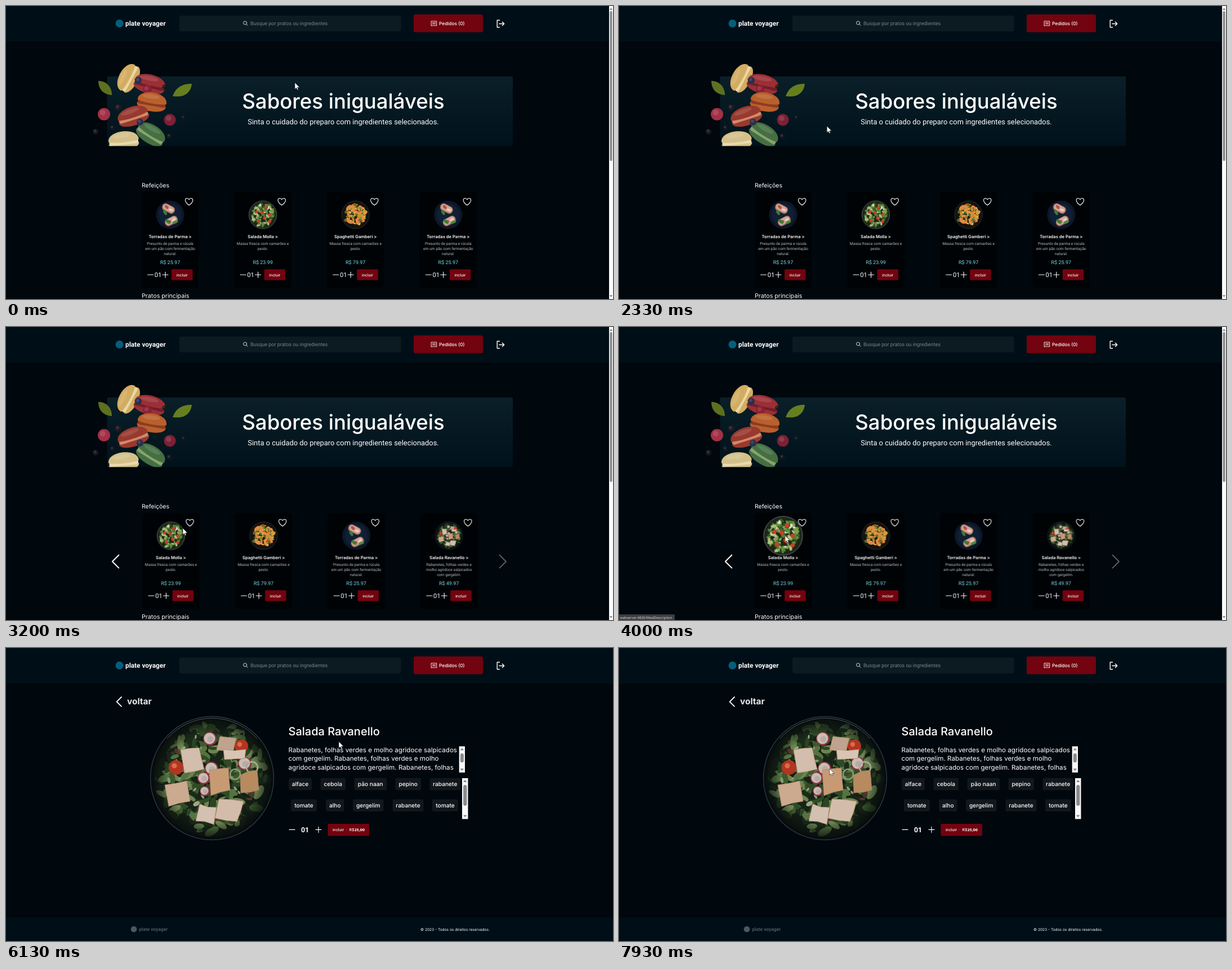
These frames come from a looping animation (1078 by 520 pixels, 8000 ms). An HTML page:

```html
<!DOCTYPE html>
<html lang="pt-BR">
<head>
<meta charset="utf-8">
<title>Cardápio</title>
<style>
html, body { margin: 0; width: 100%; height: 100%; overflow: hidden; background: #00070d; }
svg { display: block; width: 1078px; height: 520px; }
text { font-family: Inter, "Open Sans", sans-serif; font-optical-sizing: none; fill: #fff; text-rendering: geometricPrecision; white-space: pre; }
.r { font-family: Roboto, "Liberation Sans", sans-serif; }
.o { font-family: "Open Sans", "Noto Sans", sans-serif; }
.m { text-anchor: middle; }
.e { text-anchor: end; }
.line { fill: none; stroke: #fff; stroke-linecap: round; stroke-linejoin: round; }
.a { animation: 8s linear infinite; }
.home { animation-name: home; animation-timing-function: step-end; }
.detail { animation-name: detail; animation-timing-function: step-end; }
.status { animation-name: status; animation-timing-function: step-end; }
.prev { animation-name: prev; animation-timing-function: step-end; }
.next { animation-name: next; animation-timing-function: step-end; }
.slides { animation-name: slides; }
.grow { animation-name: grow; }
.cursor { animation-name: cursor; }

@keyframes home { 0% { visibility: visible } 51.6%, 100% { visibility: hidden } }
@keyframes detail { 0% { visibility: hidden } 51.6%, 100% { visibility: visible } }
@keyframes status { 0% { opacity: 0 } 43.7% { opacity: 1 } 57.5%, 100% { opacity: 0 } }
@keyframes prev { 0% { opacity: 0 } 33% { opacity: .35 } 37%, 100% { opacity: 1 } }
@keyframes next { 0% { opacity: 0 } 33% { opacity: 1 } 37%, 100% { opacity: .35 } }
@keyframes slides {
  0%, 34.5% { transform: translateX(0) }
  37% { transform: translateX(-85px) }
  37.5% { transform: translateX(-95px) }
  39.1% { transform: translateX(-160px) }
  40.4%, 100% { transform: translateX(-164.6px) }
}
@keyframes grow {
  0%, 40.8% { transform: scale(1); animation-timing-function: ease }
  45.6%, 100% { transform: scale(1.4) }
}
@keyframes cursor {
  0%, 2.5% { transform: translate(513px, 136px) }
  5% { transform: translate(520px, 100px) }
  7.5% { transform: translate(532px, 55px) }
  9.5% { transform: translate(531px, 30px) }
  11.5% { transform: translate(489px, 33px) }
  12.5% { transform: translate(494px, 33px) }
  16.3% { transform: translate(533px, 33px) }
  17.8% { transform: translate(520px, 32px) }
  19.1%, 21.7% { transform: translate(510px, 33px) }
  25.9%, 29% { transform: translate(378px, 193px) }
  29.1% { transform: translate(369px, 212px) }
  31% { transform: translate(380px, 270px) }
  33% { transform: translate(402px, 350px) }
  34.5% { transform: translate(402px, 358px) }
  37% { transform: translate(316px, 357px) }
  37.5%, 40% { transform: translate(314px, 357px) }
  43% { transform: translate(300px, 367px) }
  46.6%, 55.8% { transform: translate(295px, 370px) }
  60.9% { transform: translate(332px, 286px) }
  65.9% { transform: translate(452px, 218px) }
  68.5% { transform: translate(400px, 295px) }
  70% { transform: translate(380px, 307px) }
  72.5% { transform: translate(440px, 255px) }
  75% { transform: translate(560px, 151px) }
  76.6%, 77% { transform: translate(591px, 166px) }
  82% { transform: translate(601px, 230px) }
  87.5% { transform: translate(600px, 296px) }
  91% { transform: translate(636px, 323px) }
  96% { transform: translate(403px, 245px) }
  98.4%, 99.1% { transform: translate(452px, 305px) }
  99.13%, 100% { transform: translate(374px, 214px) }
}
</style>
</head>
<body>
<svg id="stage" viewBox="0 0 1078 520" xmlns="http://www.w3.org/2000/svg"></svg>
<script>
const RED = '#72030f', BAR = '#000f17', BLUE = '#065e7c', BRAND = 'plate voyager';

let seed = 7;
const rnd = () => (seed = (seed * 16807) % 2147483647) / 2147483647;

const text = (x, y, s, size, o = {}) =>
  `<text class="${o.c || ''}" x="${x}" y="${y}" font-size="${size}" font-weight="${o.w || 400}"` +
  `${o.f ? ` style="fill:${o.f}"` : ''}>${s.replace('>', '&gt;')}</text>`;
const rect = (x1, y1, x2, y2, fill, r = 0) =>
  `<rect x="${x1}" y="${y1}" width="${x2 - x1}" height="${y2 - y1}" rx="${r}" fill="${fill}"/>`;
const circle = (x, y, r, fill, extra = '') => `<circle cx="${x}" cy="${y}" r="${r}" fill="${fill}" ${extra}/>`;
const oval = (x, y, rx, ry, turn, fill) =>
  `<ellipse rx="${rx}" ry="${ry}" transform="translate(${x} ${y}) rotate(${turn})" fill="${fill}"/>`;
const line = (d, w = 1) => `<path class="line" d="${d}" stroke-width="${w}"/>`;
const shape = (d, fill) => `<path d="${d}" fill="${fill}"/>`;
const poly = (points, fill) => `<polygon points="${points}" fill="${fill}"/>`;
const group = (attrs, body) => `<g ${attrs}>${body}</g>`;
const minus = (x, y) => line(`M${x - 5} ${y}h10`, 1.1);
const plus = (x, y) => line(`M${x - 5} ${y}h10M${x} ${y - 5}v10`, 1.1);

// Flat pieces strewn evenly over a disc
function scatter(n, reach, size, colors) {
  let out = '';
  for (let i = 0; i < n; i++) {
    const a = rnd() * 6.283, d = reach * Math.sqrt(rnd()), s = size * (.6 + rnd() * .7);
    out += oval((d * Math.cos(a)).toFixed(1), (d * Math.sin(a)).toFixed(1), s.toFixed(1),
      (s * (.35 + rnd() * .3)).toFixed(1), Math.round(rnd() * 180), colors[i % colors.length]);
  }
  return out;
}

const toast = (x, y, turn) => group(`transform="translate(${x} ${y}) rotate(${turn})"`,
  rect(-12, -6.5, 12, 6.5, '#a8775a', 6) + rect(-10.5, -5.5, 10.5, 4.5, '#d5a397', 5) +
  oval(-4, -1, 4, 2.5, 20, '#b0514d') + oval(5, 0, 4, 2, -15, '#e6cfc1'));
const slice = ([x, y, r]) => circle(x, y, r, '#8e3343') + circle(x - .5, y - .5, r - 2, '#c9bdb6') +
  circle(x + 1, y + 1, r * .45, '#b9aaa3');
const tomato = ([x, y, r]) => circle(x, y, r, '#b2351f') + circle(x - 3, y - 3, r * .35, '#d96a4e');
const bread = (points, fill) => `<polygon points="${points}" fill="${fill}" stroke="#a98767" stroke-width=".8" stroke-linejoin="round"/>`;

const dishes = {
  toast: () => circle(0, 0, 25, '#0c1728') + circle(0, 0, 20, '#101f36') +
    toast(-3, -11, 28) + toast(2, 11, -28) +
    oval(-9, -4, 5, 2.6, 60, '#3f7a32') + oval(-4, 12, 5.5, 2.8, 40, '#3f7a32') + oval(9, 13, 5, 2.4, -20, '#4c8a3c'),
  green: () => circle(0, 0, 24.6, '#1d261b', 'stroke="#777d78" stroke-width=".7"') +
    scatter(110, 20, 3, ['#4d8233', '#7ba344', '#33591f', '#b0c37c', '#5f9440']) +
    scatter(14, 18, 2.2, ['#e9e3cf', '#d9cfb2']) +
    [[-11, -5], [5, -13], [12, 0], [3, 6], [-8, 11], [12, 12], [-2, -4]].map(p => circle(...p, 2.7, '#cf3d28')).join(''),
  pasta: () => circle(0, 0, 24.6, '#15130f', 'stroke="#3b3a35" stroke-width=".7"') +
    scatter(70, 18.5, 4, ['#c98f2e', '#e0b353', '#8a5a1b', '#d69d3c', '#5d6b24']) +
    [[-8, -10, 20], [7, -8, 120], [-9, 8, 250], [8, 10, 330]].map(([x, y, a]) =>
      `<path transform="translate(${x} ${y}) rotate(${a})" d="M-6 3A6 6 0 1 1 5 4" fill="none" stroke="#e58a42" stroke-width="4.2" stroke-linecap="round"/>`).join('') +
    scatter(8, 16, 2.4, ['#3f7030', '#64913e']),
  bread: () => circle(0, 0, 110, '#0a1110') + circle(0, 0, 104, '#131d14') +
    scatter(300, 95, 11, ['#2b4424', '#3d5a2b', '#1b2b1a', '#557340', '#2f4a26', '#6c8450', '#182417']) +
    scatter(30, 88, 5, ['#8a9a70', '#5f2f31', '#9aa884']) +
    circle(0, 0, 110, 'url(#rim)') +
    `<circle r="109.5" fill="none" stroke="#2c3840" stroke-width="1.4"/>` +
    `<path d="M-80 -70A106 106 0 0 1 80 -70" fill="none" stroke="#4b5962"/>` +
    group('transform="translate(-366 -231)"',
      [[302, 212, 13], [418, 174, 12]].map(tomato).join('') +
      [[362, 161, 12], [365, 214, 12], [351, 231, 11], [424, 205, 12], [353, 254, 9]].map(slice).join('') +
      circle(437, 212, 10, 'none', 'stroke="#a5ae98" stroke-width="2.5"') +
      circle(407, 224, 9, 'none', 'stroke="#8d9d7e" stroke-width="2.5"') +
      bread('310,181 326,178 343,177 347,196 352,215 335,219 317,222', '#d3bdac') +
      bread('380,157 409,160 406,172 403,184 374,181', '#c0a38f') +
      bread('386,180 406,182 426,180 424,196 388,198', '#d8c4b5') +
      bread('361,217 380,214 395,213 396,232 398,252 380,256 364,262', '#c89a74') +
      bread('282,243 302,240 321,236 327,272 309,275 289,281', '#cbaa90') +
      bread('416,226 430,219 446,217 449,252 433,256 417,257', '#b78b5f') +
      bread('344,277 358,282 374,283 369,313 353,308 337,307', '#d4c0b1') +
      bread('378,268 400,269 422,272 417,290 410,308 390,306 371,302', '#d3bdaa'))
};
const defs = `<defs>
  <linearGradient id="fade" x2="0" y2="1"><stop stop-color="#0a1f28"/><stop offset="1" stop-color="#00121b"/></linearGradient>
  <radialGradient id="rim"><stop offset=".72" stop-color="#060c0c" stop-opacity="0"/><stop offset="1" stop-color="#060c0c" stop-opacity=".9"/></radialGradient>
  <clipPath id="view"><path d="M182 325H897V505H182Z"/></clipPath>
  <clipPath id="crop"><path d="M140 90H350V248.5H140Z"/></clipPath>` +
  Object.entries(dishes).map(([id, draw]) => group(`id="${id}"`, draw())).join('') + '</defs>';

const header = rect(0, 0, 1078, 63, BAR) +
  circle(201.5, 31, 7, BLUE) + text(212, 35.3, BRAND, 11.8, { c: 'r', w: 700 }) +
  rect(308, 17, 701.5, 45, '#0c1b22', 3) +
  group('opacity=".8"', line('M427.6 30a3 3 0 1 1-6 0a3 3 0 1 1 6 0M426.8 32.2l2.4 2.4')) +
  text(434, 34.2, 'Busque por pratos ou ingredientes', 9, { c: 'r', f: '#7a8287' }) +
  rect(724, 15, 847, 46.5, RED, 3) +
  line('M755.5 27H764.7V35.2L763.2 34.4 761.6 35.2 760.1 34.4 758.6 35.2 757 34.4 755.5 35.2ZM757.5 29.7h5.2M757.5 31.8h5.2', .9) +
  text(769, 34, 'Pedidos (0)', 8.3, { w: 500 }) +
  line('M876.5 25.2H872.3V37.8H876.5M875.8 31.5H884.6M881.4 28.2L884.7 31.5L881.4 34.8', 1.4);

const macaron = (x, y, turn, shell, fill, w = 28) => group(`transform="translate(${x} ${y}) rotate(${turn})"`,
  shape(`M${-w} 4C${-w} 20 ${w} 20 ${w} 4Z`, shell) + rect(-w + 1, -2, w - 1, 6, fill, 4) +
  shape(`M${-w} -1C${-w - 1} -23 ${w + 1} -23 ${w} -1C${w * .6} 3 ${-w * .6} 3 ${-w} -1Z`, shell) +
  oval(-3, -10, w * .6, 4, -3, '#ffffff1c'));
const berry = (x, y, r, fill) => circle(x, y, r, fill) + circle(x - r * .2, y - r * .25, r * .45, '#ffffff20');

const banner = rect(179.5, 125, 900, 248.5, 'url(#fade)', 2) +
  group('clip-path="url(#crop)"',
    shape('M164 133C178 133 188 143 188 158C172 157 164 147 164 133Z', '#5d7020') +
    shape('M330 138C328 154 317 163 296 160C301 145 312 138 330 138Z', '#657f20') +
    macaron(218, 128, -62, '#d2ad61', '#ead7a4', 26) + macaron(255, 139, 14, '#9b2f36', '#6f1f28') +
    berry(251, 148, 8, '#8c1f33') + macaron(259, 171, 10, '#b9602c', '#8d3b24', 26) +
    macaron(226, 196, -18, '#98392f', '#d08a66') + macaron(257, 228, 32, '#456f42', '#87a36f', 27) +
    macaron(209, 240, -6, '#d4c18a', '#ead9ac', 27) +
    berry(174, 192, 11, '#a33046') + berry(291, 202, 10.5, '#7d2035') +
    berry(235, 132, 6, '#272f4d') + berry(238, 206, 6, '#272f4d') + berry(199, 180, 5.5, '#201a22') +
    berry(159, 223, 5, '#151820') + berry(189, 216, 4.5, '#12161c') + berry(290, 231, 5, '#12161c') +
    berry(315, 198, 4, '#12161c') + berry(281, 143, 3.5, '#2c1218')) +
  text(599, 182, 'Sabores inigualáveis', 36.6, { c: 'm', w: 500 }) +
  text(599, 210.3, 'Sinta o cuidado do preparo com ingredientes selecionados.', 12.92, { c: 'r m' });

const massa = ['Massa fresca com camarões e', 'pesto.'];
const parma = ['toast', 'Torradas de Parma', ['Presunto de parma e rúcula', 'em um pão com fermentação', 'natural.'], '25.97'];
const menu = [
  parma,
  ['green', 'Salada Molla', massa, '23.99'],
  ['pasta', 'Spaghetti Gamberi', massa, '79.97'],
  parma,
  ['bread', 'Salada Ravanello', ['Rabanetes, folhas verdes e', 'molho agridoce salpicados', 'com gergelim.'], '49.97']
];
const card = ([dish, name, lines, price], i) => group(`transform="translate(${291.5 + i * 164.6} 0)"`,
  rect(-50.5, 330, 50.5, 500, '#000306', 5) +
  group('transform="translate(0 370.5)"', group(i === 1 ? 'class="a grow"' : '',
    `<use href="#${dish}" ${dish === 'bread' ? 'transform="scale(.227)"' : ''}/>`)) +
  group('transform="translate(33.6 347.3)"',
    line('M0 6.2C-9 0-7.6-6-3.6-6C-1.8-6-.6-5 0-3.7C.6-5 1.8-6 3.6-6C7.6-6 9 0 0 6.2Z', 1.1)) +
  text(0, 411.5, name + ' >', 7.6, { c: 'm', w: 600 }) +
  lines.map((s, k) => text(0, 424 + k * 9, s, 6.75, { c: 'r m', f: '#b9bec2' })).join('') +
  text(0, 458, 'R$ ' + price, 9, { c: 'r m', f: '#78dbe7' }) +
  minus(-35, 477) + text(-21.5, 481.2, '01', 11.2, { c: 'r m' }) + plus(-8.5, 477) +
  rect(2.5, 467.3, 40, 486.5, RED, 2) + text(21.2, 479.5, 'incluir', 6.8, { c: 'm', w: 500 }));

// Light scrollbar with end arrows and a rounded thumb
function scrollbar(x1, y1, x2, y2, t1, t2, a) {
  const m = (x1 + x2) / 2, w = (x2 - x1) * .3;
  return rect(x1, y1, x2, y2, '#fafafa') + rect(m - w, t1, m + w, t2, '#8b8b8b', w) +
    poly(`${m - a},${y1 + 7} ${m + a},${y1 + 7} ${m},${y1 + 3}`, '#858585') +
    poly(`${m - a},${y2 - 7} ${m + a},${y2 - 7} ${m},${y2 - 3}`, '#858585');
}

const home = banner +
  text(241, 321.5, 'Refeições', 10.5) + text(241, 518.3, 'Pratos principais', 10.7) +
  group('clip-path="url(#view)"', group('class="a slides"', menu.map(card).join(''))) +
  group('class="a prev"', line('M200.3 404.8L188.8 416.2L200.3 427.6', 2)) +
  group('class="a next"', line('M876.5 404.8L888 416.2L876.5 427.6', 2)) +
  scrollbar(1071, 0, 1078, 520, 9, 275, 2.4);

const tag = y => ([x1, x2, s]) => rect(x1, y, x2, y + 21.5, '#11171b', 3) +
  text((x1 + x2) / 2, y + 14.4, s, 10.2, { c: 'm', w: 500 });
const detail = line('M205 87L196.6 95.3L205 103.6', 1.8) +
  text(215, 100.3, 'voltar', 15.4, { w: 700, f: '#e6e8ea' }) +
  '<use href="#bread" x="366" y="231"/>' +
  text(501.5, 155, 'Salada Ravanello', 20, { w: 500 }) +
  ['Rabanetes, folhas verdes e molho agridoce salpicados', 'com gergelim. Rabanetes, folhas verdes e molho',
    'agridoce salpicados com gergelim. Rabanetes, folhas']
    .map((s, i) => text(501.5, 185.2 + i * 15.2, s, 11.64)).join('') +
  scrollbar(804.7, 174.5, 815, 221, 187, 203, 3.2) +
  [[502, 543, 'alface'], [558.5, 603, 'cebola'], [618.5, 676, 'pão naan'], [691.5, 737, 'pepino'],
    [752.5, 807, 'rabanete']].map(tag(230.7)).join('') +
  [[506, 552, 'tomate'], [568, 600.5, 'alho'], [616, 670.5, 'gergelim'], [686.5, 741.5, 'rabanete'],
    [757, 803, 'tomate']].map(tag(268.5)).join('') +
  scrollbar(810, 231, 820.5, 303.5, 243, 280, 3.2) +
  minus(508, 322.4) + text(531, 327, '01', 12.4, { c: 'r m', w: 700 }) + plus(555, 322.4) +
  rect(571.5, 312, 645, 333.5, RED, 2) +
  text(580, 325, 'incluir  ·  R$', 6.9, { w: 500 }) + text(637, 325, '25,00', 6.2, { c: 'e', w: 800 }) +
  rect(0, 478, 1078, 520, BAR) +
  circle(227, 499, 5.3, '#4c585e') + text(236.3, 502.2, BRAND, 8.4, { c: 'r', w: 700, f: '#4c585e' }) +
  text(736, 501.5, '© 2023 - Todos os direitos reservados.', 6.6);

const status = rect(0, 510, 99, 520, '#3b3d40', 1) +
  text(2, 518, 'webserver:4820/MealDescription', 6, { c: 'o', f: '#e4e6e8' });
const cursor = '<path d="M0 0V11.6L2.6 9.2L4.4 13L6.2 12.2L4.5 8.5H8.3Z" fill="#fff" stroke="#1a1a1a" stroke-width=".6"/>';

document.getElementById('stage').innerHTML = defs + rect(0, 0, 1078, 520, '#00070d') + header +
  group('class="a home"', home) + group('class="a detail"', detail) +
  group('class="a status"', status) + group('class="a cursor"', cursor);
</script>
</body>
</html>
```
